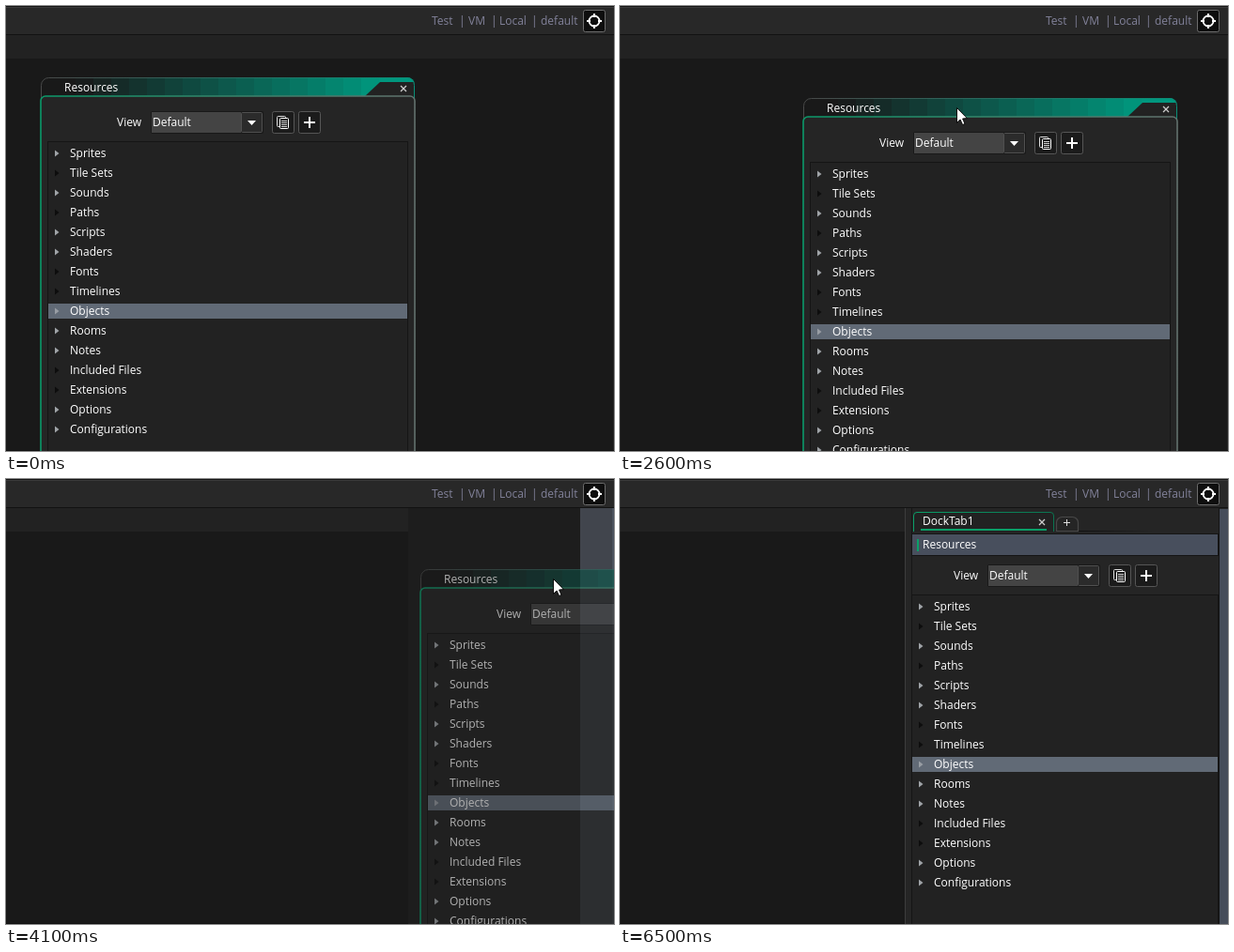
These frames come from a looping animation (647 px wide and 474 px high, 7000 ms). An HTML page with a canvas:

```html
<!DOCTYPE html>
<html lang="en">
<head>
<meta charset="utf-8">
<title>Docking a window</title>
<style>
html, body { margin: 0; height: 100%; overflow: hidden; background: #191919; }
canvas { display: block; }
</style>
</head>
<body>
<canvas id="stage" width="647" height="474"></canvas>
<script>
const W = 647, H = 474, LOOP = 7000;
const stage = document.getElementById('stage').getContext('2d');
let g = stage;

const ROWS = ['Sprites', 'Tile Sets', 'Sounds', 'Paths', 'Scripts', 'Shaders', 'Fonts', 'Timelines',
  'Objects', 'Rooms', 'Notes', 'Included Files', 'Extensions', 'Options', 'Configurations'];
const EMPTY = ['Tile Sets', 'Paths', 'Fonts', 'Timelines', 'Included Files', 'Extensions'];

// Keys: time, x, y
const POINTER = [[0, -12, 82], [800, 35, 86], [1600, 158, 86], [2400, 324, 106], [2600, 358, 108],
  [3200, 500, 108], [3400, 545, 108], [4000, 579, 107], [4100, 582, 106], [4800, 622, 91], [5000, 628, 88]];
const DRAG = [[1600, 36, 76], [2400, 167, 95], [2600, 194, 98], [3200, 355, 98], [3400, 400, 98],
  [4000, 439, 97], [4100, 440, 96], [4800, 480, 81]];

function at(keys, t) {
  const i = keys.findIndex(k => k[0] >= t);
  if (i < 0) return keys[keys.length - 1].slice(1);
  if (i === 0) return keys[0].slice(1);
  const a = keys[i - 1], b = keys[i], f = (t - a[0]) / (b[0] - a[0]);
  return [1, 2].map(n => Math.round(a[n] + (b[n] - a[n]) * f));
}

function rect(x, y, w, h, fill) {
  g.fillStyle = fill;
  g.fillRect(x, y, w, h);
}

function text(s, x, y, fill = '#fff') {
  g.font = '12px "Open Sans", sans-serif';
  g.fillStyle = fill;
  g.fillText(s, x, y);
}

function line(points, color, width = 1) {
  g.beginPath();
  points.forEach(p => g.lineTo(...p));
  g.strokeStyle = color;
  g.lineWidth = width;
  g.stroke();
}

function poly(points, fill) {
  g.beginPath();
  points.forEach(p => g.lineTo(...p));
  g.closePath();
  g.fillStyle = fill;
  g.fill();
}

function box(x, y, w, h, r, fill, stroke) {
  g.beginPath();
  g.roundRect(x + .5, y + .5, w - 1, h - 1, r);
  g.fillStyle = fill;
  g.fill();
  g.strokeStyle = stroke;
  g.lineWidth = 1;
  g.stroke();
}

function fade(x0, x1, from, to) {
  const f = g.createLinearGradient(x0, 0, x1, 0);
  f.addColorStop(0, from);
  f.addColorStop(1, to);
  return f;
}

function cross(x, y, color) {
  line([[x - 3, y - 3], [x + 3, y + 3]], color, 1.2);
  line([[x + 3, y - 3], [x - 3, y + 3]], color, 1.2);
}

// View selector and its two buttons; x is the left edge of the label
function viewBar(x, y) {
  text('View', x, y + 16);
  box(x + 36, y, 120, 24, 1, '#191919', '#191919');
  rect(x + 37, y + 1, 95, 22, '#444');
  box(x + 132, y + 1, 23, 22, 1, '#2b2b2b', '#505050');
  poly([[x + 139, y + 10], [x + 148, y + 10], [x + 143.5, y + 15]], '#fff');
  text('Default', x + 38, y + 16);
  for (const dx of [165, 193]) box(x + dx, y, 24, 24, 2, '#1b1b1b', '#565656');
  box(x + 170, y + 5, 10, 12, 1, '#1b1b1b', '#ddd');
  box(x + 173, y + 7, 10, 12, 1, '#1b1b1b', '#fff');
  for (const dy of [10, 12, 14, 16]) rect(x + 175, y + dy, 6, 1, '#ccc');
  rect(x + 199, y + 11, 12, 2, '#fff');
  rect(x + 204, y + 6, 2, 12, '#fff');
}

function tree(x, y, w) {
  rect(x - 1, y - 1, w + 2, 600, '#151515');
  rect(x, y, w, 600, '#222');
  ROWS.forEach((name, i) => {
    const mid = y + 12 + i * 21, on = name === 'Objects';
    if (on) rect(x, mid - 8, w, 16, '#616a76');
    const tone = EMPTY.includes(name) ? '#0d0d0d' : on ? '#989da4' : '#a0a4a8';
    poly([[x + 7, mid - 3.5], [x + 11.5, mid], [x + 7, mid + 3.5]], tone);
    text(name, x + 23, mid + 4);
  });
}

function makePanel() {
  const c = document.createElement('canvas');
  c.width = 400;
  c.height = 480;
  g = c.getContext('2d');

  // Banded title bar
  g.save();
  g.beginPath();
  g.roundRect(1, 0, 398, 30, [8, 8, 0, 0]);
  g.clip();
  for (let x = 0; x < 400; x += 19) {
    const f = Math.min(1, Math.max(0, (x - 30) / 320));
    rect(x, 0, 19, 20, `rgb(${25 - 25 * f},${25 + 126 * f},${25 + 101 * f})`);
  }
  poly([[346, 20], [362, 5], [399, 5], [399, 20]], '#222');
  g.restore();
  g.beginPath();
  g.roundRect(1.5, .5, 397, 30, 8);
  g.strokeStyle = fade(0, 400, '#484848', '#0a8f78');
  g.lineWidth = 1;
  g.stroke();
  text('Resources', 26, 15);
  cross(387, 12, '#ccc');

  g.beginPath();
  g.roundRect(1, 20, 398, 500, 5);
  g.fillStyle = '#252525';
  g.fill();
  g.strokeStyle = fade(0, 400, '#0a9a6a', '#62716d');
  g.lineWidth = 1.6;
  g.stroke();

  viewBar(82, 36);
  tree(9, 69, 382);
  g = stage;
  return c;
}

function shell() {
  rect(0, 0, W, H, '#191919');
  rect(0, 0, W, 30, '#282828');
  rect(0, 0, W, 1, '#161616');
  rect(0, 1, W, 1, '#3a3a3a');
  rect(0, 30, W, 1, '#121212');
  rect(0, 31, W, 25, '#222');
  rect(646, 31, 1, H, '#262626');
  rect(0, H - 1, W, 1, '#121212');
  const labels = { 453: 'Test', 482: '|', 492: 'VM', 516: '|', 525: 'Local', 559: '|', 569: 'default' };
  for (const x in labels) text(labels[x], +x, 20, '#82829a');
  box(614, 4, 24, 24, 2, '#0e0e0e', '#6c6c6c');
  g.beginPath();
  g.arc(626, 16, 5.5, 0, 7);
  g.strokeStyle = '#fff';
  g.lineWidth = 1.8;
  g.stroke();
  for (const d of [-8, 4]) {
    rect(626 + d, 15, 4, 2, '#fff');
    rect(625, 16 + d, 2, 4, '#fff');
  }
}

function docked(lit) {
  rect(303, 31, 344, 443, '#252525');
  rect(303, 31, 1, 443, '#3c3c3c');
  rect(310, 31, 1, 443, '#161616');
  rect(488, 55, 80, 1, fade(488, 568, '#111', '#252525'));

  g.beginPath();
  g.moveTo(312.5, 56);
  g.lineTo(312.5, 39);
  g.quadraticCurveTo(312.5, 35.5, 316, 35.5);
  g.lineTo(458, 35.5);
  g.quadraticCurveTo(461.5, 35.5, 461.5, 39);
  g.lineTo(461.5, 56);
  g.fillStyle = '#222';
  g.fill();
  g.strokeStyle = fade(312, 462, '#0a9f68', '#0b7350');
  g.lineWidth = 1;
  g.stroke();
  rect(320, 53, 134, 2, '#0a9f68');
  text('DockTab1', 322, 49);
  cross(449, 46, '#ccc');
  g.beginPath();
  g.roundRect(464.5, 40.5, 23, 15, [6, 6, 0, 0]);
  g.strokeStyle = '#484848';
  g.stroke();
  rect(472, 46, 7, 1, '#ddd');
  rect(475, 43, 1, 7, '#ddd');

  rect(310, 58, 327, 24, '#151515');
  rect(311, 59, 325, 22, '#484f5d');
  rect(316, 64, 2, 13, '#0a9f68');
  text('Resources', 322, 74);
  viewBar(355, 91);
  tree(311, 124, 325);
  rect(637, 31, 1, 443, '#151515');
  rect(638, 32, 9, 442, lit ? '#464d5a' : '#252525');
}

function pointer(x, y) {
  g.save();
  g.translate(x, y);
  const shape = [[.5, .5], [.5, 16.3], [4.1, 13], [6.6, 18.5], [9, 17.5], [6.6, 12], [11.4, 11.6]];
  poly(shape, '#fff');
  line([...shape, shape[0]], '#000', .9);
  g.restore();
}

const panel = makePanel();

function draw(t) {
  shell();
  if (t < 4900) {
    const preview = t >= 3900;
    if (preview) rect(428, 31, 219, 443, '#1d1d1d');
    if (t >= 4100) {
      rect(611, 31, 36, 443, '#41454d');
      rect(645, 31, 2, 443, '#4c535e');
    }
    g.globalAlpha = preview ? .65 : 1;
    g.drawImage(panel, ...at(DRAG, t));
    g.globalAlpha = 1;
  } else {
    docked(t >= 6500);
  }
  if (t < 5500) pointer(...at(POINTER, t));
  else if (t < 6000) pointer(513, 364);
}

const start = performance.now();
function tick() {
  const t = (performance.now() - start) % LOOP;
  draw(Math.floor(t / 100) * 100);
  requestAnimationFrame(tick);
}
tick();
</script>
</body>
</html>
```
